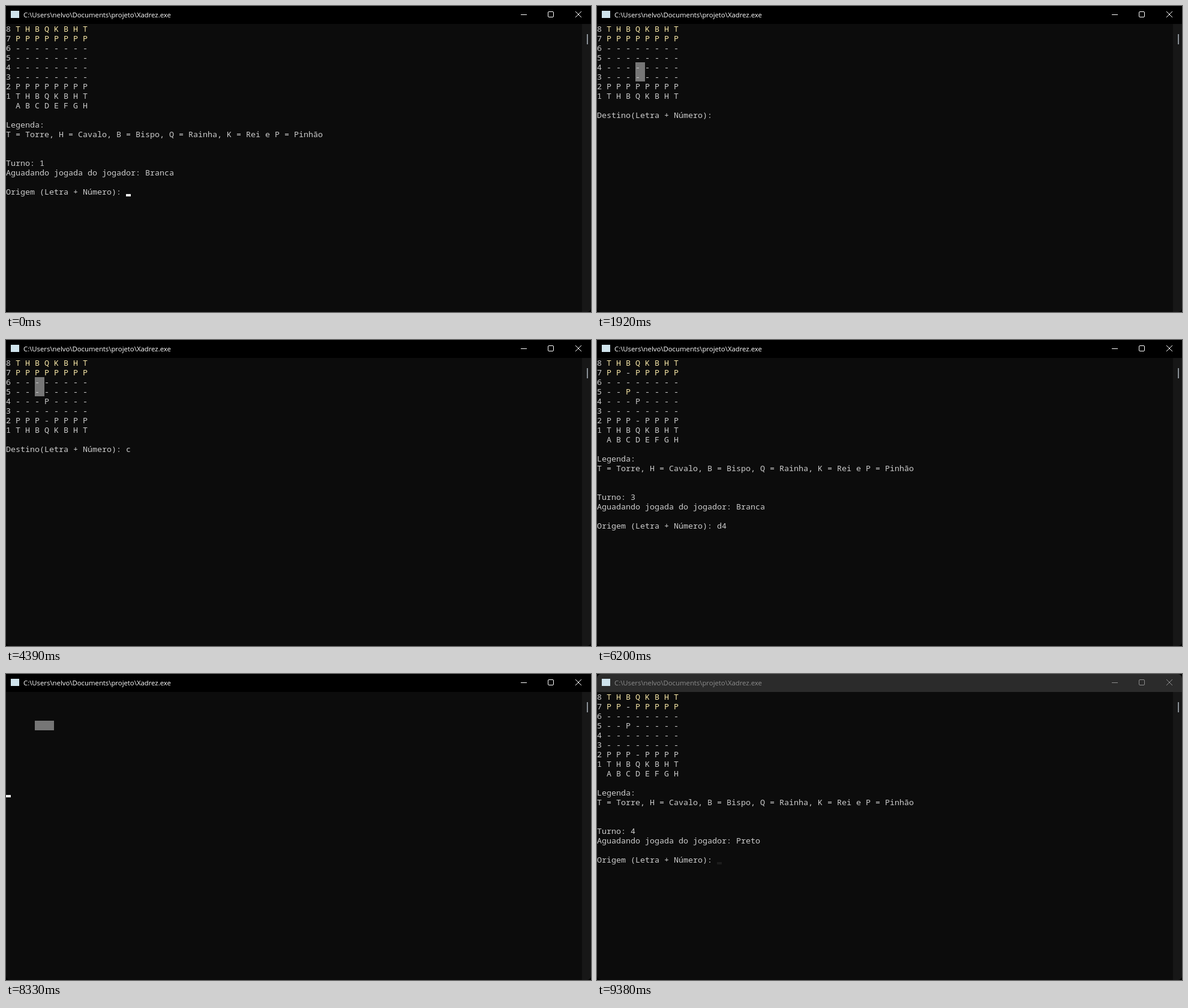
An HTML page with a canvas that plays this animation: 975x511 px, repeating every 9.45 s.

```html
<!DOCTYPE html>
<html lang="pt">
<head>
<meta charset="utf-8">
<title>Xadrez</title>
<style>
  html, body { margin: 0; width: 100%; height: 100%; overflow: hidden; background: #000; }
  canvas { display: block; }
</style>
</head>
<body>
<canvas id="stage" width="975" height="511"></canvas>
<script>
const ctx = document.getElementById('stage').getContext('2d', { alpha: false });
const W = 975, H = 511, BAR = 30, CELL = 8, LINE = 16, LOOP = 9450, INPUT = 25;
const MONO = '500 13.33px "Noto Sans Mono", "DejaVu Sans Mono", monospace';
const SANS = '500 11.35px "Open Sans", "Noto Sans", sans-serif';
const GREY = '#cccccc', YELLOW = '#f9e8a8', MARK = '#767676', BACK = '#0c0c0c';

// Lower case pieces belong to the black (yellow) side.
const START = ['thbqkbht', 'pppppppp', '--------', '--------',
               '--------', '--------', 'PPPPPPPP', 'THBQKBHT'];
const MOVES = ['d2d4', 'c7c5', 'd4c5'];
const TARGETS = [['d4', 'd3'], ['c6', 'c5'], ['c5', 'd5']];

// time, screen, turn, typed text, caret: column offset, 'next' line or null
const STEPS = [
  [0, 'from', 1, '', 0],
  [60, 'from', 1, 'd', 1],
  [390, 'from', 1, 'd', null],
  [720, 'from', 1, 'd2', 2],
  [850, 'from', 1, 'd2', null],
  [1250, 'from', 1, 'd2', 'next'],
  [1320, 'clear', 1, '', 'next'],
  [1390, 'to', 1, '', 0],
  [1920, 'to', 1, '', null],
  [1990, 'to', 1, 'd', 1],
  [2390, 'to', 1, 'd4', 2],
  [2530, 'to', 1, 'd4', 'next'],
  [2590, 'clearTo', 1, '', 'next'],
  [2660, 'from', 2, '', 0],
  [2920, 'from', 2, 'c', 1],
  [3250, 'from', 2, 'c7', 2],
  [3650, 'from', 2, 'c7', null],
  [4050, 'clear', 2, '', 'next'],
  [4130, 'to', 2, '', 0],
  [4390, 'to', 2, 'c', null],
  [4520, 'to', 2, 'c', 1],
  [4650, 'to', 2, 'c5', 2],
  [4860, 'to', 2, 'c5', 'next'],
  [4920, 'from', 3, '', 0],
  [5460, 'from', 3, 'd', 1],
  [5660, 'from', 3, 'd', null],
  [6060, 'from', 3, 'd4', 2],
  [6200, 'from', 3, 'd4', null],
  [6660, 'clear', 3, '', null],
  [6720, 'to', 3, '', 0],
  [6790, 'to', 3, 'c', null],
  [6860, 'to', 3, 'c', 1],
  [7260, 'to', 3, 'c', null],
  [7730, 'to', 3, 'c5', 2],
  [8330, 'clearTo', 3, '', 'next'],
  [8390, 'from', 4, '', 0],
  [8850, 'from', 4, '', 'faded']
];

const square = name => ({ col: name.charCodeAt(0) - 97, row: 8 - name[1] });

function boardAt(turn) {
  const board = START.map(row => [...row]);
  for (const move of MOVES.slice(0, turn - 1)) {
    const a = square(move.slice(0, 2)), b = square(move.slice(2));
    board[b.row][b.col] = board[a.row][a.col];
    board[a.row][a.col] = '-';
  }
  return board;
}

function rect(color, x, y, w, h) {
  ctx.fillStyle = color;
  ctx.fillRect(x, y, w, h);
}

function print(text, col, row, color = GREY) {
  ctx.fillStyle = color;
  [...text].forEach((ch, i) => ctx.fillText(ch, (col + i) * CELL, BAR + row * LINE + 13));
}

function caret(col, row, color = '#f2f2f2') {
  rect(color, col * CELL, BAR + row * LINE + 12, CELL, 4);
}

function drawMarks(turn) {
  for (const name of TARGETS[turn - 1]) {
    const { col, row } = square(name);
    rect(MARK, (2 + col * 2) * CELL, BAR + row * LINE, CELL * 2, LINE);
  }
}

function drawBoard(turn) {
  boardAt(turn).forEach((line, row) => {
    print(String(8 - row), 0, row);
    line.forEach((p, col) =>
      print(p.toUpperCase(), 2 + col * 2, row, /[a-z]/.test(p) ? YELLOW : GREY));
  });
}

function drawConsole([, screen, turn, typed, cursor]) {
  ctx.font = MONO;
  const choosing = screen === 'to' || screen === 'clearTo';
  const inputRow = choosing ? 9 : 17;
  if (choosing) drawMarks(turn);
  if (screen === 'to' || screen === 'from') {
    drawBoard(turn);
    print(choosing ? 'Destino(Letra + Número):' : 'Origem (Letra + Número):', 0, inputRow);
    print(typed, INPUT, inputRow);
  }
  if (screen === 'from') {
    print('A B C D E F G H', 2, 8);
    print('Legenda:', 0, 10);
    print('T = Torre, H = Cavalo, B = Bispo, Q = Rainha, K = Rei e P = Pinhão', 0, 11);
    print('Turno: ' + turn, 0, 14);
    print('Aguadando jogada do jogador: ' + (turn % 2 ? 'Branca' : 'Preto'), 0, 15);
  }
  if (cursor === 'next') caret(0, inputRow + 1);
  else if (cursor === 'faded') caret(INPUT, inputRow, '#1c1c1c');
  else if (cursor !== null) caret(INPUT + cursor, inputRow);
}

function drawTitle(t) {
  const [bar, ink] = t >= 9380 ? ['#2b2b2b', '#8c8c8c']
                   : t >= 9250 ? ['#161616', '#c4c4c4'] : ['#000000', '#ffffff'];
  rect(bar, 0, 0, W, BAR);
  rect('#cfe3ec', 8, 8, 14, 12);
  ctx.font = SANS;
  ctx.fillStyle = ink;
  ctx.fillText('C:\\Users\\nelvo\\Documents\\projeto\\Xadrez.exe', 29, 19);
  ctx.strokeStyle = ink;
  ctx.lineWidth = 1;
  ctx.beginPath();
  ctx.moveTo(858, 14.5);
  ctx.lineTo(868, 14.5);
  ctx.roundRect(903.5, 9.5, 9, 9, 1.5);
  ctx.moveTo(949, 9);
  ctx.lineTo(959, 19);
  ctx.moveTo(959, 9);
  ctx.lineTo(949, 19);
  ctx.stroke();
}

function draw(t) {
  rect('#000', 0, 0, W, H);
  ctx.save();
  ctx.beginPath();
  ctx.roundRect(0, 0, W, H, 7);
  ctx.clip();
  rect(BACK, 0, BAR, W, H - BAR);
  rect('#171717', 960, BAR, 15, H - BAR);
  rect('#8a9096', 968, 47, 2, 17);
  drawConsole(STEPS.findLast(step => step[0] <= t));
  drawTitle(t);
  ctx.restore();
}

const begin = performance.now();
function tick() {
  draw((performance.now() - begin) % LOOP);
  requestAnimationFrame(tick);
}
tick();
</script>
</body>
</html>
```
